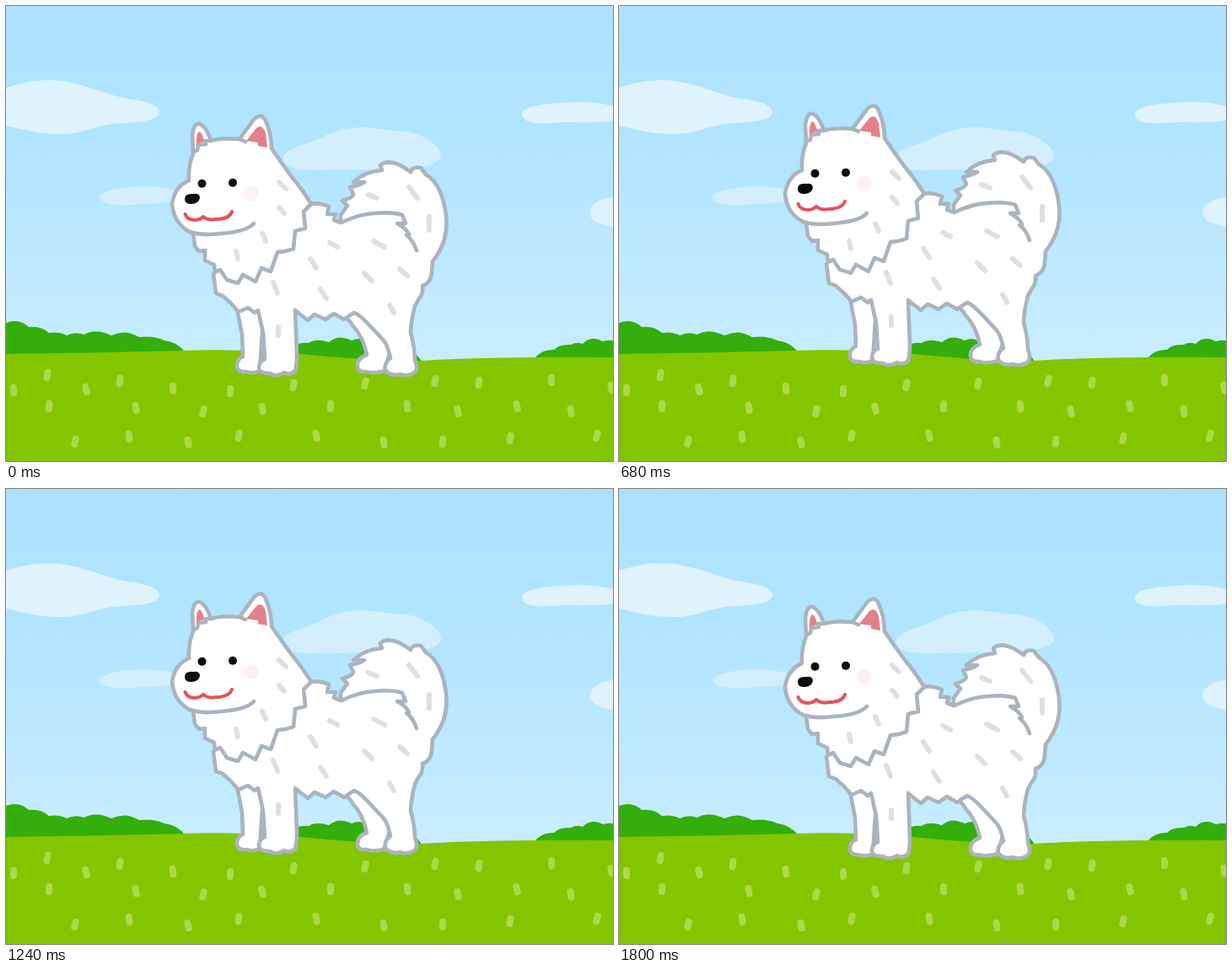
Write an HTML page that moves like this. It is 720 by 540 pixels and loops after 1920 ms.

```html
<!DOCTYPE html>
<html lang="en">
<head>
<meta charset="utf-8">
<title>Jumping dog</title>
<style>
  html, body { margin: 0; width: 100%; height: 100%; overflow: hidden; }
  svg { display: block; width: 100vw; height: 100vh; }
  .line { fill: none; stroke: #aab4be; stroke-width: 4.6; }
  .fur { fill: #fff; }
  #dog, #grass { stroke-linecap: round; stroke-linejoin: round; }
  #tufts { fill: none; stroke: #dedee5; stroke-width: 6; }
</style>
</head>
<body>
<svg viewBox="0 0 720 540" preserveAspectRatio="none">
  <defs>
    <linearGradient id="sky" x2="0" y2="1">
      <stop offset="0" stop-color="#abe1ff"/>
      <stop offset=".45" stop-color="#b3e5ff"/>
      <stop offset="1" stop-color="#c9edff"/>
    </linearGradient>
  </defs>

  <rect width="720" height="425" fill="url(#sky)"/>

  <g fill="#def3fd">
    <path d="M0 97C25 89 38 88 52 88C90 89 115 105 145 110C170 113 182 119 182 126C181 138 150 138 126 140C100 144 90 152 65 152C40 152 22 147 0 142Z"/>
    <path d="M612 129C612 119 635 116 670 114C690 113 710 116 720 119V136C705 139 680 138 660 138C635 140 613 141 612 129Z"/>
    <path d="M720 227C705 228 692 236 692 246C693 255 706 260 720 262Z"/>
  </g>
  <g fill="#d3effd">
    <path d="M329 181C328 168 360 165 378 154C395 146 410 144 425 144C445 145 460 149 475 149C495 152 516 166 516 178C514 192 480 193 455 193C425 195 395 194 365 195C345 195 330 192 329 181Z"/>
    <path d="M111 227C113 218 145 214 165 214C190 215 207 219 208 226C205 234 180 234 160 235C135 238 112 236 111 227Z"/>
  </g>

  <g fill="#33ae0a">
    <path d="M0 376Q16 370 27 381Q41 379 51 388Q64 386 72 391Q82 386 93 390Q106 382 125 391Q142 383 158 393Q176 391 188 397Q201 398 212 410V420H0Z"/>
    <path d="M322 411Q329 402 342 404Q347 399 359 400Q367 394 383 399Q394 389 410 397Q422 391 431 402Q441 399 449 406Q461 401 472 408Q485 408 493 422H322Z"/>
    <path d="M627 418Q636 407 650 408Q656 401 670 402Q677 398 684 401Q694 390 708 398Q714 396 720 397V425H627Z"/>
  </g>

  <path fill="#83c500" d="M0 413C65 412 130 411 205 409C260 407 300 409 340 412C400 418 450 422 490 421C560 417 640 416 720 417V540H0Z"/>
  <g id="grass" stroke="#abd94a" stroke-width="8"></g>

  <g id="dog">
    <path class="line fur" d="M274 359L280 390L281 416Q273 419 274 429Q276 435 285 434Q292 437 301 433L306 355Z"/>
    <path class="line fur" d="M397 366Q407 371 411 379Q424 393 428 414Q416 418 417 428Q418 435 427 434Q437 437 449 433L460 395L430 362Z"/>

    <path class="line fur" d="M358 236Q369 232 383 238L381 247L391 247L389 254L397 257
      L397 248L405 237L399 231Q411 228 412 223L408 215Q420 213 425 209L412 209Q426 196 446 195L444 189Q456 179 480 197
      Q482 190 492 192L498 200Q514 209 520 237Q529 275 506 303
      L505 316Q504 329 494 332Q495 342 490 347L485 356Q480 376 480 388Q485 406 485 420Q490 432 483 436Q475 440 467 437Q456 440 450 432Q448 424 456 418
      Q453 403 448 397L434 382Q424 371 417 366
      L413 364Q406 368 401 372L389 365L379 372L366 366L358 373L349 366L343 361
      L345 414Q345 426 343 433Q337 439 330 435Q321 441 313 436Q299 436 300 428Q301 421 307 419
      L305 388L299 361L295 364L287 358L276 363L266 352L257 344L249 341L246 318"/>
    <path class="line" d="M398 257Q418 247 438 246Q458 244 470 248L474 258L464 258Q475 264 478 271L475 272Q483 278 487 290"/>

    <path class="line fur" d="M222 269L224 285L229 291L236 290L236 302L247 307L248 316L254 313L262 325L275 329L281 319L296 327
      L303 311L314 315L322 292Q331 292 341 288L343 267L355 264L353 244L362 235
      Q351 217 339 203L326 185L315 169Q315 151 307 134Q301 126 293 136L277 158Q255 156 243 160
      Q238 144 230 140Q223 138 221 153L222 175Q216 189 217 207
      Q200 214 197 235Q199 258 218 268"/>
    <path class="line" d="M218 268Q233 273 255 270Q285 268 294 258M222 173L227 171L228 165L237 164L236 160L243 160M277 158L284 161"/>

    <g fill="#e28189">
      <path d="M226 166Q225 150 230 149Q234 153 235 161L228 163Z"/>
      <path d="M285 160L297 145Q304 139 308 151L310 168L299 166V162Z"/>
    </g>
    <circle cx="291" cy="223" r="9" fill="#fdf2f3"/>
    <g fill="#0c0c0c">
      <circle cx="232.5" cy="210.8" r="5"/>
      <circle cx="269" cy="209.8" r="5"/>
      <path d="M212 229Q212 222 222 223Q230 222 230 228Q228 235 220 235Q212 235 212 229Z"/>
    </g>
    <path fill="none" stroke="#e4525d" stroke-width="4" d="M212.500 247Q215 254 224 254Q230 254 234 250Q239 255 249 253Q265 253 268 244"/>
    <path id="tufts" d="M324 209L332 217M324 239L330 246M304 270L308 279M273 291L275 300M384 281L393 286M361 300L368 311
      M317 328L322 341M373 336L380 347M323 381L323 391M436 279L449 286M425 317L434 326M467 312L476 320M455 355L460 364
      M430 224L440 228M478 215L488 228M502 250L502 266"/>
  </g>
</svg>

<script>
  const LOOP = 1920, STEP = 40, FIRST_HOP = 100, HOP = 560, HOPS = 3;
  const PEAK = 0.3, LAND = 0.69;      // fractions of one hop
  const HEIGHT = 81, SQUASH = 0.1;
  const PIVOT_X = 360, PIVOT_Y = 488;

  const blades = [
    [9, 456], [49, 438], [95, 455], [135, 445], [51, 475], [154, 477], [82, 517], [146, 511], [198, 454], [234, 481],
    [216, 518], [266, 457], [276, 510], [304, 478], [341, 450], [385, 475], [368, 510], [426, 448], [448, 518], [476, 475],
    [509, 445], [536, 481], [518, 517], [561, 447], [606, 475], [598, 513], [647, 444], [670, 481], [701, 510], [718, 453]
  ];
  document.getElementById('grass').innerHTML = blades.map(([x, y], i) => {
    const lean = Math.sin(i * 2.3) * 0.8;
    return `<path d="M${x + lean} ${y - 3.2}L${x - lean} ${y + 3.2}"/>`;
  }).join('');

  function pose(time) {
    const progress = (time - FIRST_HOP) / HOP;
    if (progress < 0 || progress >= HOPS) return { lift: 0, squash: 0 };
    const hop = Math.floor(progress), u = progress - hop;
    const strength = 1 - hop / HOPS;
    if (u >= LAND) {
      return { lift: 0, squash: SQUASH * strength * Math.sin(Math.PI * (u - LAND) / (1 - LAND)) };
    }
    const fall = u < PEAK
      ? (1 - u / PEAK) ** 2
      : ((u - PEAK) / (LAND - PEAK)) ** 1.65;
    return { lift: HEIGHT * strength * (1 - fall), squash: 0 };
  }

  const dog = document.getElementById('dog');
  function draw() {
    const time = Math.floor(performance.now() % LOOP / STEP) * STEP;
    const { lift, squash } = pose(time);
    dog.setAttribute('transform',
      `translate(${PIVOT_X} ${PIVOT_Y - lift}) scale(${1 + squash} ${1 - squash}) translate(${-PIVOT_X} ${-PIVOT_Y})`);
    requestAnimationFrame(draw);
  }
  draw();
</script>
</body>
</html>
```
